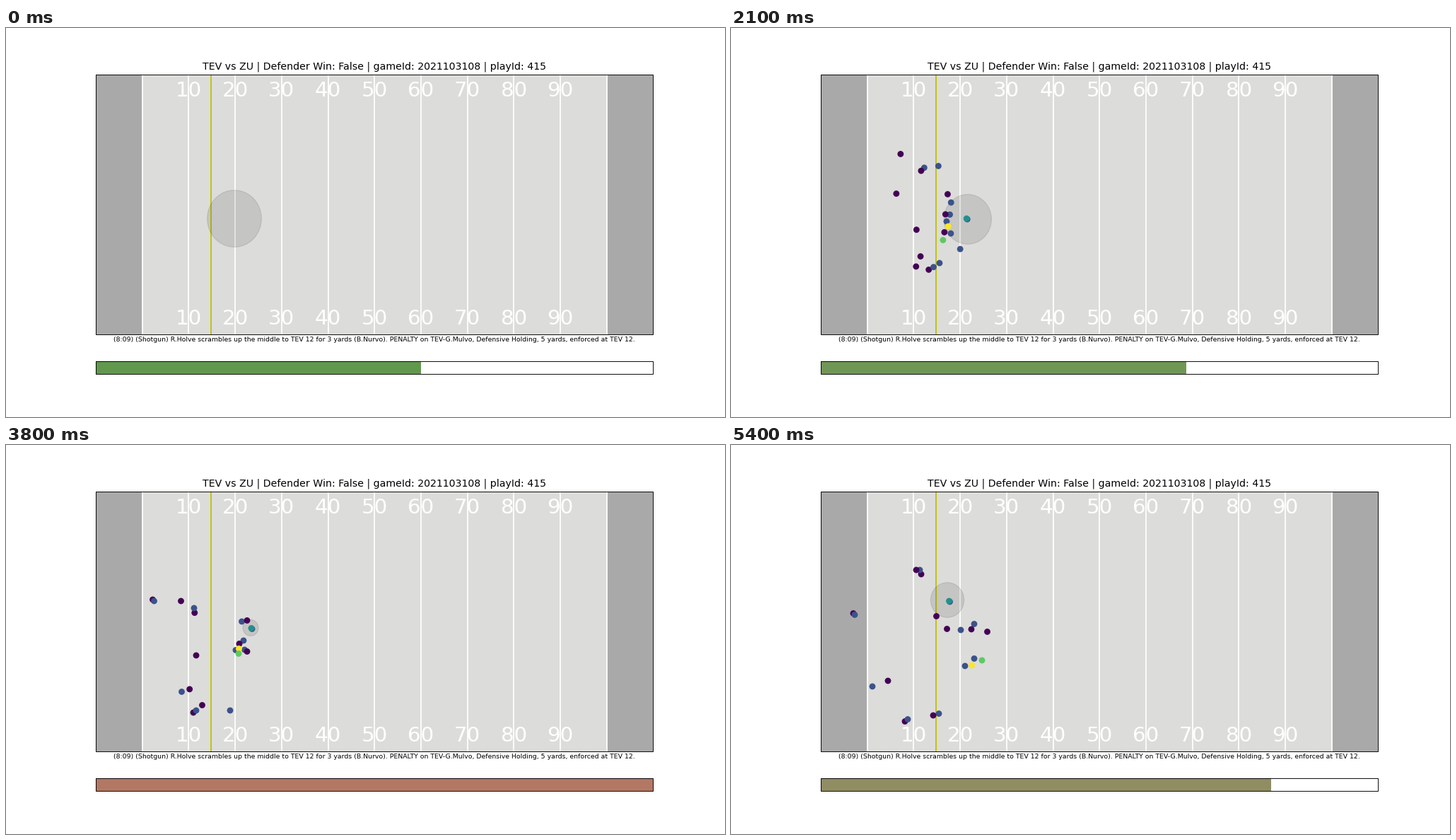
Write a matplotlib script that moves like this. It is 1017 px wide and 551 px high and loops after 5500 ms.

```python
import numpy as np
import matplotlib.pyplot as plt
from matplotlib.animation import FuncAnimation
from matplotlib.patches import Ellipse, Rectangle

W, H, DPI = 1017, 551, 64
FRAMES, INTERVAL = 55, 100
LEFT, RIGHT, TOP, BOTTOM = .125 * W, .9 * W, .12 * H, 433.6
BAR_TOP, BAR_BOTTOM = 472, .89 * H
YARD_X, YARD_Y = (RIGHT - LEFT) / 120, (BOTTOM - TOP) / 53.3

TITLE = "TEV vs ZU | Defender Win: False | gameId: 2021103108 | playId: 415"
CAPTION = ("(8:09) (Shotgun) R.Holve scrambles up the middle to TEV 12 for 3 yards "
           "(B.Nurvo). PENALTY on TEV-G.Mulvo, Defensive Holding, 5 yards, "
           "enforced at TEV 12.")

# Each player stands still until the first key, then runs through two more points.
KEYS = np.array([11, 38, 54])
SNAP, SNAP_FLIGHT, SNAP_SPOT = 9, 6, np.array([291.5, 269.5])

OFFENCE = {
    "slot": [(304, 175), (266, 231), (267, 177)],
    "deep": [(293.5, 191.5), (209.5, 221), (175, 240.5)],
    "right tackle": [(304, 246.5), (333.5, 250), (344, 253.5)],
    "right guard": [(298, 257.5), (336, 277), (325, 262)],
    "center": [(298, 270.5), (325, 290.5), (331, 313)],
    "passer": [(324, 270), (348, 260.5), (309.5, 222)],
    "back": [(324, 289.5), (317, 376), (294, 380.5)],
    "left tackle": [(301.5, 293), (337.5, 290), (344, 302.5)],
    "flat": [(302.5, 318), (269, 376), (250, 388.5)],
    "cross": [(295, 333.5), (248.5, 349.5), (200, 342)],
}
DEFENCE = [
    [(279, 189.5), (247.5, 221), (262, 177)],
    [(293, 232), (341, 248.5), (340, 261)],
    [(290, 254.5), (330, 281.5), (305.5, 260.5)],
    [(262.5, 274), (269, 298), (290.5, 242.5)],
    [(289.5, 284.5), (341, 292.5), (362.5, 264.5)],
    [(265.5, 308), (277.5, 368.5), (286, 383)],
]
BLOCKER = [(300, 281), (329.5, 288.5), (340.5, 312)]
RUSHER = [(292, 303.5), (329, 295.5), (355, 305)]

# Coverage: receiver, gap before, gap after, frame when the gap has closed.
COVERAGE = [
    ("deep", (-43.5, -25), (-2, -2), 38),
    ("slot", (-76, 48), (2, 6), 40),
    ("flat", (-42.5, 5.5), (-4, 3), 38),
    ("cross", (-10, 5), (22, -8), 54),
]

BAR_TIMES = [0, 18, 24, 30, 33, 38, 40, 46, 54]
BAR_LEVELS = [.583, .607, .704, .764, .764, 1, 1, .738, .808]
SHADE_AT = [.583, .75, 1]
SHADES = np.array([(97, 152, 77), (132, 147, 96), (178, 120, 100)]) / 255


def pt(pixels):
    return pixels * 72 / DPI


def smoothstep(start, end, t):
    u = np.clip((t - start) / (end - start), 0, 1)
    return u * u * (3 - 2 * u)


def run(path, t):
    """Cubic Hermite position on a path that starts from rest."""
    path = np.array(path, float)
    slopes = np.gradient(path, KEYS, axis=0)
    slopes[0] = 0
    t = np.clip(t, KEYS[0], KEYS[-1])
    i = int(t >= KEYS[1])
    span = KEYS[i + 1] - KEYS[i]
    u = (t - KEYS[i]) / span
    s = u * u * (3 - 2 * u)
    return (path[i] + s * (path[i + 1] - path[i])
            + span * u * (1 - u) * ((1 - u) * slopes[i] - u * slopes[i + 1]))


def cover(receiver, before, after, closed, t):
    gap = np.array(before) + smoothstep(13, closed, t) * np.subtract(after, before)
    return run(OFFENCE[receiver], t) + gap


def ball(t):
    flight = np.clip((t - SNAP) / SNAP_FLIGHT, 0, 1)
    hands = run(OFFENCE["passer"], t) + (-1, -1)
    return SNAP_SPOT + flight * (hands - SNAP_SPOT)


def all_spots(t):
    return np.array([cover(*c, t) for c in COVERAGE]
                    + [run(p, t) for p in [*OFFENCE.values(), *DEFENCE, BLOCKER, RUSHER]]
                    + [ball(t)])


ROLES = [0] * len(COVERAGE) + [1] * len(OFFENCE) + [0] * len(DEFENCE) + [4, 3, 2]

plt.rcParams["font.family"] = "DejaVu Sans"
fig = plt.figure(figsize=(W / DPI, H / DPI), dpi=DPI, facecolor="white")
ax = fig.add_axes([0, 0, 1, 1])
ax.set(xlim=(0, W), ylim=(H, 0))
ax.axis("off")


def box(x0, y0, x1, y1, **style):
    return ax.add_patch(Rectangle((x0, y0), x1 - x0, y1 - y0, **style))


def outline(y0, y1):
    box(LEFT, y0, RIGHT, y1, fill=False, edgecolor="black", lw=pt(.94), zorder=5)


def yard_line(yard, color):
    x = LEFT + (yard + 10) * YARD_X
    ax.plot([x, x], [TOP, BOTTOM], color=color, lw=pt(1.77), zorder=1, solid_capstyle="butt")
    return x


box(LEFT, TOP, RIGHT, BOTTOM, color="darkgray", lw=0, zorder=0)
box(LEFT + 10 * YARD_X, TOP, RIGHT - 10 * YARD_X, BOTTOM, color="#dcdcda", lw=0, zorder=.5)
for yard in range(0, 101, 10):
    x = yard_line(yard, "white")
    if 0 < yard < 100:
        for baseline in (96.6, 420.2):
            ax.text(x, baseline, str(yard), color="white", size=pt(29.4), ha="center", zorder=3)
yard_line(14.8, "y")
outline(TOP, BOTTOM)
outline(BAR_TOP, BAR_BOTTOM)

middle = (LEFT + RIGHT) / 2
ax.text(middle, 59, TITLE, size=pt(14.12), ha="center")
ax.text(middle, 444.4, CAPTION, size=pt(9.42), ha="center")

zone = ax.add_patch(Ellipse((0, 0), 1, 1, color="black", alpha=.1, lw=pt(1.18), zorder=2))
dots = ax.scatter(*all_spots(0).T, c=ROLES, cmap="viridis", s=pt(7.06)**2,
                  lw=pt(1.77), zorder=2.5)
fill = box(LEFT, BAR_TOP, RIGHT, BAR_BOTTOM, lw=0, zorder=1)


def update(frame):
    dots.set_offsets(all_spots(frame))
    dots.set_visible(frame > 0)

    progress = np.interp(frame, BAR_TIMES, BAR_LEVELS)
    fill.set_width(progress * (RIGHT - LEFT))
    fill.set_facecolor([np.interp(progress, SHADE_AT, channel) for channel in SHADES.T])

    # The zone leads the passer by one frame and shrinks as progress grows.
    passer = OFFENCE["passer"]
    radius = 1.67 + 10 * (1 - progress)
    zone.set_center(2 * run(passer, frame) - run(passer, frame - 1) - (1, 0))
    zone.set_width(2 * radius * YARD_X)
    zone.set_height(2 * radius * YARD_Y)
    return dots, fill, zone


anim = FuncAnimation(fig, update, frames=FRAMES, interval=INTERVAL, repeat=True, repeat_delay=0)
plt.show()
```
